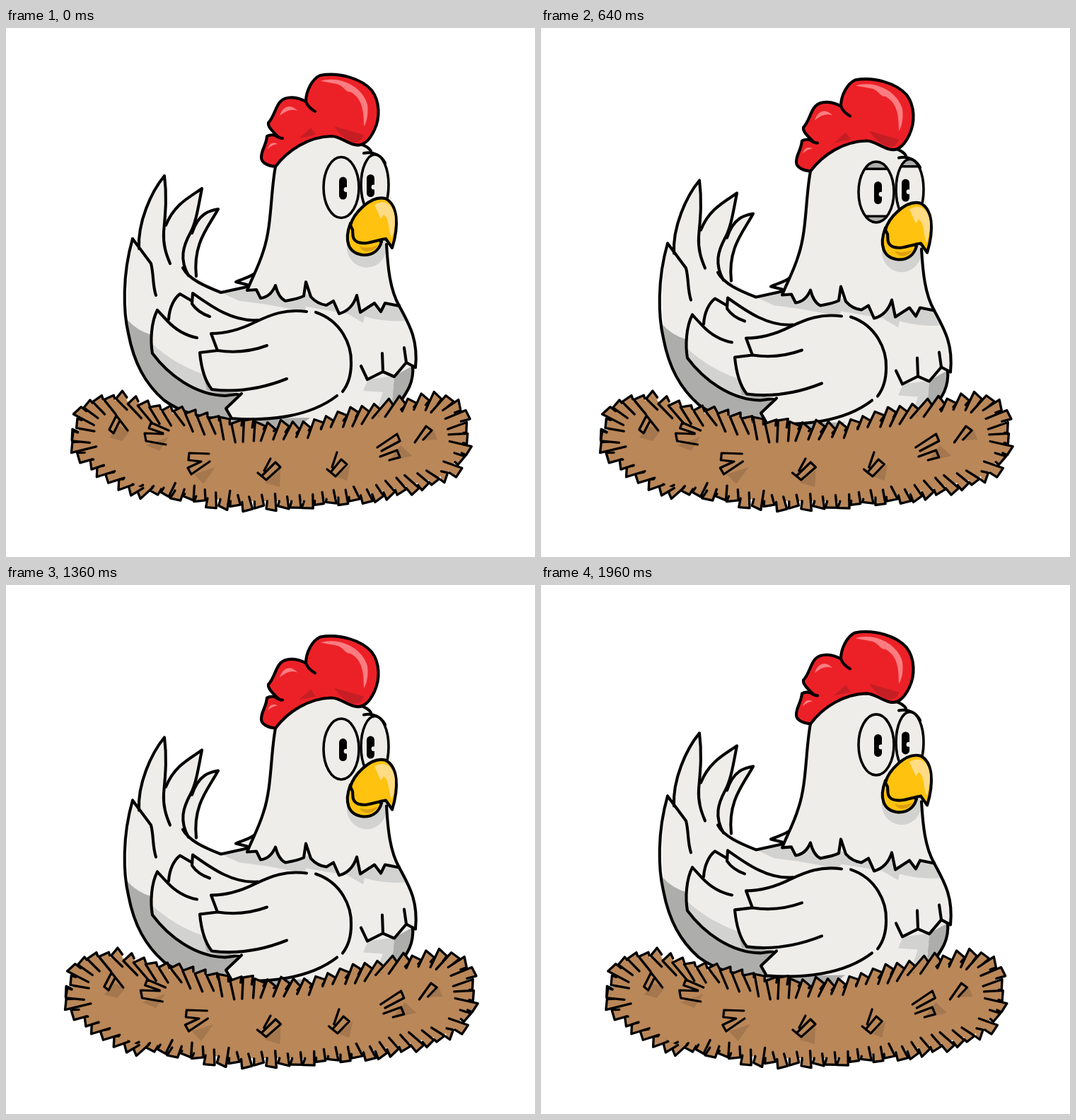
An HTML page with a canvas that plays this animation: 748 px wide and 748 px high, repeating every 2000 ms.

```html
<!DOCTYPE html>
<html lang="en">
<head>
<meta charset="utf-8">
<title>Nesting hen</title>
<style>
html, body { margin: 0; width: 100%; height: 100%; overflow: hidden; background: #fff; }
canvas { display: block; width: 748px; height: 748px; }
</style>
</head>
<body>
<canvas id="stage" width="748" height="748"></canvas>
<script>
const ctx = document.getElementById('stage').getContext('2d');
const LOOP = 2000, STEP = 40, MID = 374;
const BODY = '#eeedea', PALE = '#d2d2d1', GREY = '#adadab';
const RED = '#ec2127', YELLOW = '#ffc20e', BROWN = '#ba8759', SHADE = '#a4774e';

function fill(d, color) {
  ctx.fillStyle = color;
  ctx.fill(new Path2D(d));
}
function line(d, width = 4.1) {
  ctx.lineWidth = width;
  ctx.stroke(new Path2D(d));
}
function shape(d, color, width) {
  fill(d, color);
  line(d, width);
}

function drawBody() {
  fill('M179 298 L188 310 C188 270 205 232 224 209 C228 235 228 255 226 278 C240 248 260 238 277 227 ' +
    'C274 245 270 260 266 282 C275 264 288 258 300 256 C288 275 270 305 269 352 L304 374 L345 366 ' +
    'L420 360 L540 380 L556 393 C569 418 583 440 579 478 C577 505 566 520 555 540 L540 566 L320 566 ' +
    'C270 558 225 535 205 510 C175 470 162 390 179 298 Z', BODY);
  fill('M171 412 Q185 428 206 434 L207 460 C230 490 265 515 310 520 L333 517 L311 537 L320 553 ' +
    'L430 551 L400 575 L330 566 C270 556 225 535 205 510 C187 485 176 450 171 412 Z', GREY);
  fill('M304 374 L345 365 L423 376 L558 390 L564 414 Q535 416 507 408 L505 417 L483 404 ' +
    'L424 394 L422 402 C390 394 360 389 330 386 Z', PALE);
  fill('M549 492 L578 476 C577 505 566 520 555 540 L545 540 Z', GREY);
  fill('M512 497 L549 492 L545 540 L524 540 L533 515 L505 513 Z', PALE);
}

function drawTailLines() {
  line('M179 298 C164 350 166 402 173 432 C181 474 197 503 223 526 C250 546 285 553 316 554');
  line('M179 298 L205 333 C209 348 207 363 212 378');
  line('M188 312 C186 275 205 232 224 209 C228 240 225 265 223 288 C222 306 226 319 232 333');
  line('M226 279 C238 249 260 239 277 227 C272 252 269 274 261 289 C250 309 245 327 258 350');
  line('M263 290 C272 262 288 258 300 256 C286 282 264 304 269 351');
  line('M250 339 C258 355 281 365 304 374 L345 365');
}

function drawChestLines() {
  line('M556 393 C570 419 583 440 579 480 L566 473 L549 493 L533 486 L511 497 L502 478');
  line('M533 486 L532 460 M566 473 L563 452');
  line('M575 478 C577 502 567 515 554 533');
}

function drawWing() {
  fill('M214 399 C204 422 204 445 208 462 C230 490 265 515 310 520 L333 517 L370 449 L356 413 ' +
    'C320 416 288 392 264 375 L246 376 C238 382 231 395 230 412 Z', BODY);
  fill('M207 447 C228 466 252 480 280 490 L300 520 C262 512 230 492 208 462 Z', PALE);
  fill('M277 484 L291 511 L333 517 L310 520 L284 512 Z', GREY);
  line('M214 399 C205 416 204 443 207 460 C230 491 268 519 310 520 L333 517');
  line('M214 399 L228 414 C241 428 255 435 270 438');
  line('M230 412 C231 395 238 382 246 376 L263 386');
  line('M288 408 Q271 402 263 390 L264 375 C288 392 320 416 356 413');
  fill('M425 401 C395 397 375 405 352 416 C330 427 310 432 290 432 L299 456 L274 459 ' +
    'C276 480 282 500 291 511 L333 517 L311 538 L319 552 C370 555 430 550 468 518 L488 485 ' +
    'C490 450 475 415 438 402 Z', BODY);
  line('M425 401 C395 397 375 405 352 416 C330 427 310 432 290 432 L299 456 L274 459 ' +
    'C276 480 282 500 291 511 C330 516 367 508 397 496');
  line('M299 456 C325 460 350 456 369 449');
  line('M333 517 L311 538 L319 552 C368 556 428 551 468 520');
  line('M438 402 C474 414 489 448 488 474 C488 493 483 505 476 514');
}

function drawHead() {
  shape('M354 345 C347 352 336 354 325 359 L341 363', BODY);
  const fringe = 'C374 232 376 280 364 315 C357 338 348 353 341 371 L354 370 L360 382 C368 381 376 376 381 364 ' +
    'C384 376 389 383 395 386 C406 384 415 382 421 379 L424 359 L431 380 C438 388 446 391 453 392 ' +
    'L463 386 L471 404 C482 401 491 394 496 378 L501 402 L521 389 L530 401 L536 389 L556 393 ' +
    'C543 370 540 340 538 306';
  fill('M381 196 ' + fringe + ' L546 250 L540 205 C534 184 520 172 500 165 L460 150 C430 153 400 170 381 196 Z', BODY);
  fill('M482 306 A28 29 0 0 0 538 313 L538 300 Z', PALE);
  line('M381 196 ' + fringe);
  line('M506 177 C520 174 531 181 536 191');
  line('M500 164 C508 166 513 169 516 174');
}

function drawComb() {
  shape('M381 196 C371 195 361 191 361 183 C361 172 368 166 369 153 C374 150 381 151 385 154 ' +
    'C377 146 370 140 371 134 C379 126 381 111 388 104 C397 95 413 98 424 104 C424 89 433 72 444 67 ' +
    'C472 62 503 72 517 88 C529 104 529 127 521 144 C514 159 505 168 493 165 C480 162 472 153 460 153 ' +
    'C428 154 399 172 381 196 Z', RED);
  line('M424 104 C426 109 430 114 437 118 M381 152 Q386 156 391 156');
  fill('M414 156 L431 141 L438 151 Z M464 139 L506 151 C503 160 498 162 491 161 Q477 158 464 139 Z', '#c51e24');
  fill('M445 75 C468 67 503 80 511 108 C513 123 509 136 506 139 C506 115 503 98 486 90 ' +
    'C481 92 476 80 467 79 Z', '#fb7d81');
  fill('M387 124 C391 111 402 106 412 117 C404 114 397 116 387 124 Z M370 171 Q374 159 384 164 Q376 165 370 171 Z', '#fb7d81');
}

function drawEye(x, y, rx, px, lid) {
  const ry = 43;
  const oval = new Path2D();
  oval.ellipse(x, y, rx, ry, 0, 0, 7);
  ctx.fillStyle = '#fff';
  ctx.fillStyle = BODY;
  ctx.fill(oval);
  ctx.save();
  ctx.clip(oval);
  ctx.fillStyle = '#000';
  ctx.beginPath();
  ctx.roundRect(px - 5.5, y - 15, 11, 32, 5.5);
  ctx.fill();
  ctx.fillStyle = BODY;
  ctx.beginPath();
  ctx.arc(px + 4.5, y + 3, 3.4, 0, 7);
  ctx.fill();
  if (lid > 0) {
    const top = y - ry + lid * 46, low = y + ry - lid * 40;
    ctx.fillStyle = GREY;
    ctx.fillRect(x - rx, y - ry, 2 * rx, top - y + ry);
    ctx.fillRect(x - rx, low, 2 * rx, y + ry - low);
    line(`M${x - rx} ${top} h${2 * rx} M${x - rx} ${low} h${2 * rx}`, 3.4);
  }
  ctx.restore();
  ctx.lineWidth = 3.6;
  ctx.stroke(oval);
}

function drawBeak() {
  shape('M487 276 C478 300 483 319 506 321 C520 321 528 313 531 302 L510 290 Z', YELLOW);
  fill('M500 309 Q513 313 526 307 Q521 316 510 316 Q503 315 500 309 Z', '#dba00e');
  shape('M487 279 C491 263 515 236 536 241 C554 249 556 279 546 311 L537 298 ' +
    'C523 300 510 307 498 303 C488 299 491 290 490 285 Z', YELLOW);
  fill('M521 250 C533 242 549 247 550 270 Q550 286 545 297 C540 282 542 269 534 264 L530 270 Z', '#ffdc84');
}

// Rim of the nest: x, y and the heading of the straw in degrees.
const RIM = [
  [91, 574, 190], [100, 550, 205], [107, 531, 220], [130, 520, 235], [160, 519, 235],
  [200, 532, 235], [235, 538, 240], [270, 541, 248], [305, 552, 255], [340, 555, 272],
  [375, 559, 290], [410, 562, 300], [450, 553, 300], [490, 540, 300], [530, 536, 308],
  [570, 526, 305], [605, 520, 300], [635, 528, 320], [650, 548, 335], [656, 573, 350],
  [655, 597, 375], [643, 617, 382], [634, 634, 388], [605, 645, 396], [570, 655, 412],
  [530, 664, 428], [480, 672, 440], [430, 679, 452], [385, 678, 456], [340, 678, 445],
  [300, 676, 460], [262, 670, 465], [220, 660, 485], [170, 654, 520], [138, 631, 535],
  [106, 612, 530], [97, 598, 530], [91, 574, 550]
];

const noise = i => {
  const v = Math.sin(i * 12.9898) * 43758.5453;
  return v - Math.floor(v);
};

// Each straw has one long side, so neighbours share a single line.
function makeStraws() {
  const list = [], gap = 17;
  let left = 0;
  for (let k = 0; k + 1 < RIM.length; k++) {
    const a = RIM[k], b = RIM[k + 1];
    const len = Math.hypot(b[0] - a[0], b[1] - a[1]);
    let s = left;
    for (; s < len; s += gap) {
      const [x, y, deg] = a.map((v, j) => v + (b[j] - v) * s / len);
      const i = list.length;
      const turn = (deg + (noise(i + 1) - 0.5) * 14) * Math.PI / 180;
      const out = (noise(i + 60) - 0.5) * 8;
      const dx = Math.cos(turn), dy = Math.sin(turn);
      const at = (along, side) => [x + dx * along - dy * side, y + dy * along + dx * side];
      const wide = 6.5 + noise(i + 200) * 1.5;
      const slant = (noise(i + 300) - 0.5) * 5;
      const deep = (y < 600 ? 22 : 13) + noise(i + 400) * 11;
      list.push({
        base: at(-9, 0),
        quad: [at(-deep, -5), at(out + slant, -wide), at(out - slant, wide), at(-9, 6)]
      });
    }
    left = s - len;
  }
  return list;
}

const poly = pts => 'M' + pts.map(p => p.map(v => v.toFixed(1)).join(' ')).join('L');
const straws = makeStraws();
const core = poly(straws.map(s => s.base)) + 'Z';
const quads = straws.map(s => poly(s.quad));

const TWIG_SHADOWS = 'M146 579 L160 563 L175 570 L164 584 Z M198 590 L230 578 L217 598 Z ' +
  'M266 631 L296 621 L279 645 Z M366 643 L388 625 L387 649 Z M466 634 L487 617 L482 640 Z ' +
  'M541 613 L558 590 L574 605 Z M586 583 L604 567 L610 582 Z';
const TWIGS = 'M172 569 L156 548 L146 568 L152 573 L160 557 ' +
  'M230 569 L205 558 L202 566 L222 573 M222 574 L196 573 L198 584 L226 589 ' +
  'M287 602 L259 601 L258 611 L276 613 L257 622 L262 631 L288 613 ' +
  'M374 609 L365 626 M356 629 L368 639 L388 621 L381 614 L363 632 ' +
  'M468 600 L461 621 M454 624 L466 634 L482 617 L474 610 L460 627 ' +
  'M525 593 L553 574 L557 584 L531 598 M529 606 L553 597 L557 607 L542 611 ' +
  'M578 586 L594 563 L602 569 L590 582';

function drawNest() {
  fill(core, BROWN);
  quads.forEach(q => shape(q, BROWN, 3.3));
  fill(TWIG_SHADOWS, SHADE);
  line(TWIGS, 3.2);
}

function draw(t) {
  const squash = 1 - Math.abs(t / 1000 - 1);
  const lid = Math.max(0, 1 - Math.abs(t - 500) / 180);
  ctx.setTransform(1, 0, 0, 1, 0, 0);
  ctx.fillStyle = '#fff';
  ctx.fillRect(0, 0, 748, 748);
  ctx.strokeStyle = '#000';
  ctx.lineJoin = ctx.lineCap = 'round';

  ctx.translate(0, squash * 10.2);
  drawBody();
  drawTailLines();
  drawChestLines();
  drawWing();
  drawHead();
  drawComb();
  drawEye(521.5, 222, 19.5, 515.5, lid);
  drawEye(474, 225.5, 25, 476.5, lid);
  drawBeak();

  const widen = 1 + squash * 0.049;
  ctx.setTransform(widen, 0, 0, 1, MID * (1 - widen), 0);
  drawNest();
}

const start = performance.now();
function tick() {
  const t = (performance.now() - start) % LOOP;
  draw(Math.floor(t / STEP) * STEP);
  requestAnimationFrame(tick);
}
tick();
</script>
</body>
</html>
```
